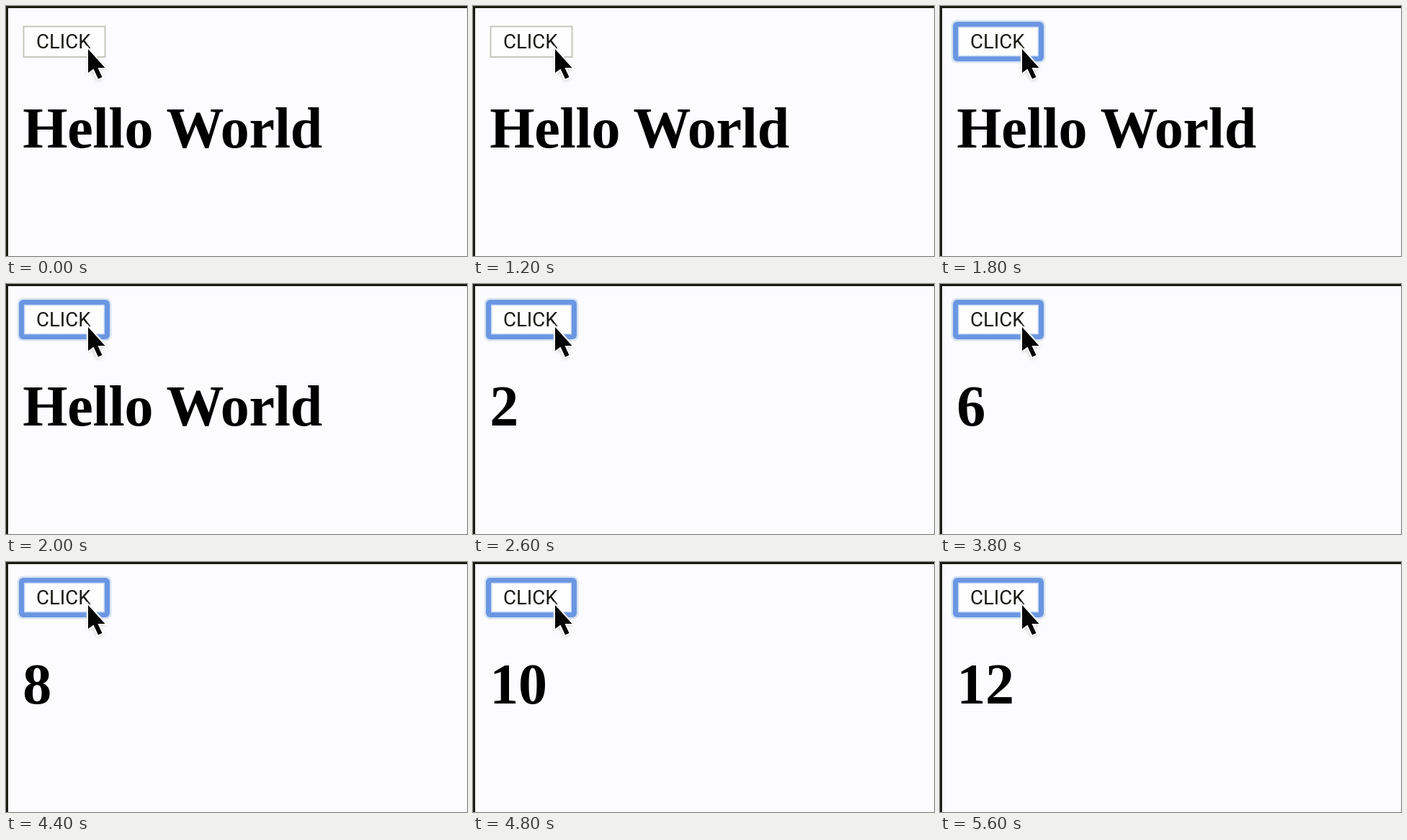
Recreate the animation shown at these times as an HTML page. Size 640 by 348 pixels, loop 5800 ms.

```html
<!DOCTYPE html>
<html lang="en">
<head>
<meta charset="utf-8">
<title>Click counter</title>
<style>
  html, body { margin: 0; width: 100%; height: 100%; overflow: hidden; background: #fcfcff; }
  svg { display: block; width: 640px; height: 348px; }
  .label { font: 27.6px Roboto, "Liberation Sans", sans-serif; fill: #1a1a14; }
  .title { font: bold 80px "Liberation Serif", Times, serif; font-kerning: normal; letter-spacing: -.25px; }
</style>
</head>
<body>
<svg viewBox="0 0 640 348">
  <defs>
    <filter id="soft" x="-50%" y="-50%" width="200%" height="200%">
      <feGaussianBlur stdDeviation="2.2"/>
    </filter>
  </defs>
  <path d="M0 0H640V3H3V348H0Z" fill="#1c1c12"/>

  <rect id="rest" x="24.5" y="28.5" width="113" height="42.5" fill="#fefeff" stroke="#c6c6bc" stroke-width="2"/>
  <g id="focus">
    <rect x="15.5" y="19.5" width="131" height="60" rx="8" fill="#d6e3f1"/>
    <rect x="18" y="22" width="126" height="55" rx="6" fill="#6a96e2"/>
    <rect x="25" y="28.7" width="112" height="41.6" fill="#c6d7f4"/>
    <rect x="26.5" y="30.2" width="109" height="38.6" fill="#fefeff"/>
  </g>
  <text class="label" x="42" y="59">CLICK</text>

  <text class="title" id="title" x="23.2" y="196.6"></text>

  <path d="M113 62V96L120 91L127 105L135 101L130 89L140 87Z" fill="#c9c9c0" filter="url(#soft)"/>
  <path d="M114 60V93L121.5 87.5L128 101.5L133.5 99L127.5 86H137.5Z"
        fill="#050505" stroke="#fff" stroke-width="4" paint-order="stroke"/>
</svg>
<script>
  const LOOP = 5800, STEP = 200, FOCUS_AT = 1600, COUNT_FROM = 1800, CLICK_GAP = 300;
  const el = id => document.getElementById(id);
  const start = performance.now();

  function draw(now) {
    const elapsed = Math.max(0, now - start) % LOOP;
    const t = Math.floor(elapsed / STEP) * STEP;
    const focused = t >= FOCUS_AT;
    const count = Math.floor((t - COUNT_FROM) / CLICK_GAP);
    el("rest").style.display = focused ? "none" : "";
    el("focus").style.display = focused ? "" : "none";
    el("title").textContent = count > 0 ? count : "Hello World";
    requestAnimationFrame(draw);
  }
  draw(start);
</script>
</body>
</html>
```
